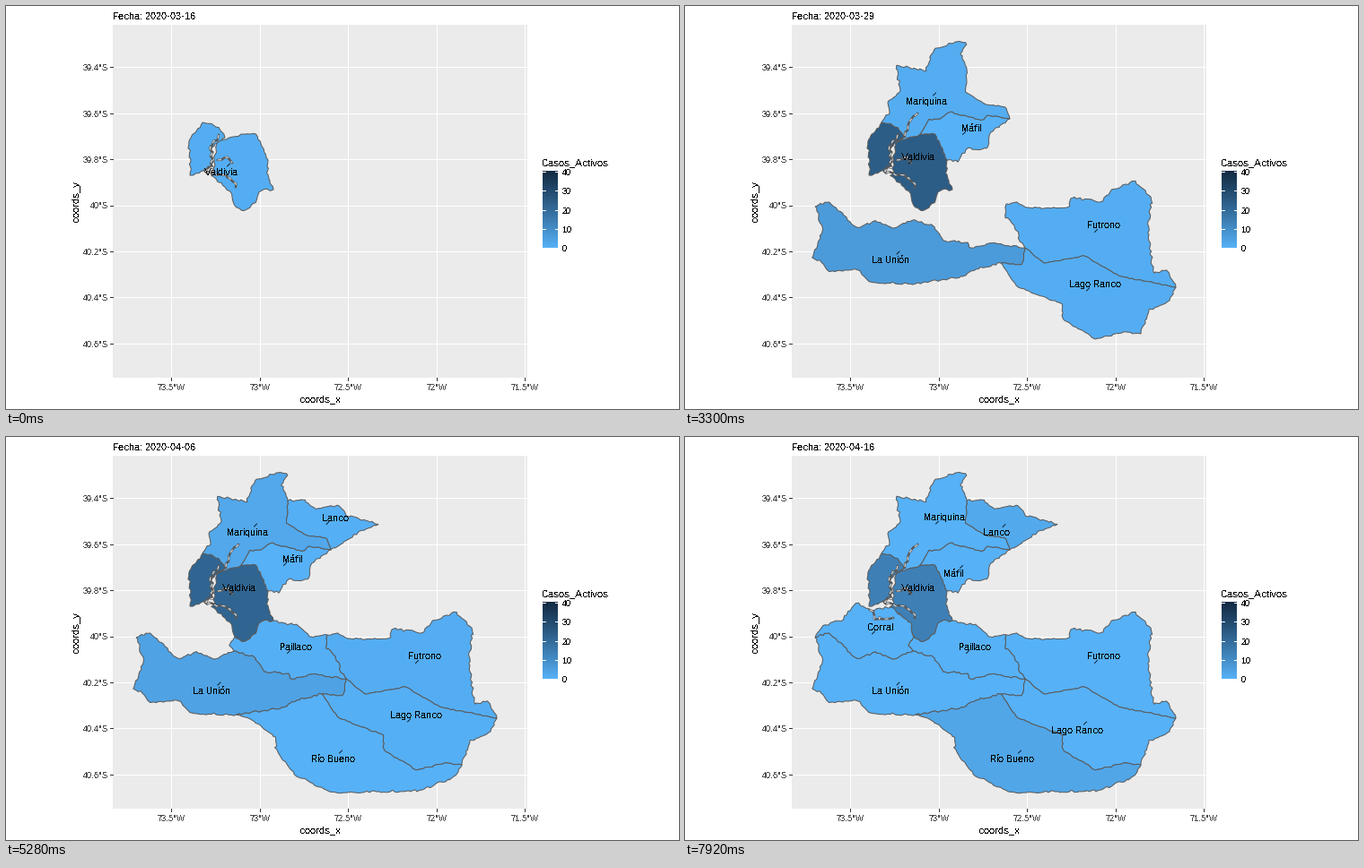
Recreate the animation shown at these times as a matplotlib script. Size 750 by 450 pixels, loop 8 s.

```python
import numpy as np
import matplotlib.pyplot as plt
from matplotlib.animation import FuncAnimation

plt.rcParams.update({
    "font.family": "Liberation Sans",
    "text.antialiased": False,
    "text.hinting": "native",
    "text.hinting_factor": 1,
})

W, H = 750, 450
TICK = 20            # ms per animation frame
STEP = 330           # ms per map state
LOOP = 8000
LAST = 24            # last map state
DAYS = 31            # days covered by the states
PANEL, EDGE, GREY = "#EBEBEB", "#595959", "#4D4D4D"
rng = np.random.default_rng(16)


# ---- colour scale: straight line in Lab between two blues ----
TO_XYZ = np.array([[.4124, .3576, .1805], [.2126, .7152, .0722], [.0193, .1192, .9505]])
WHITE = TO_XYZ.sum(axis=1)


def rgb_to_lab(rgb):
    c = np.array(rgb) / 255
    lin = np.where(c > .04045, ((c + .055) / 1.055) ** 2.4, c / 12.92)
    f = np.cbrt(TO_XYZ @ lin / WHITE)
    return np.array([116 * f[1] - 16, 500 * (f[0] - f[1]), 200 * (f[1] - f[2])])


def lab_to_rgb(lab):
    fy = (lab[0] + 16) / 116
    f = np.array([fy + lab[1] / 500, fy, fy - lab[2] / 200])
    lin = np.clip(np.linalg.inv(TO_XYZ) @ (f ** 3 * WHITE), 0, 1)
    return np.where(lin > .0031308, 1.055 * lin ** (1 / 2.4) - .055, 12.92 * lin)


LIGHT, DARK = rgb_to_lab((86, 177, 247)), rgb_to_lab((19, 43, 67))


def shade(cases):
    return lab_to_rgb(LIGHT + (DARK - LIGHT) * cases / 40)


# ---- borders: a few key points, resampled every 3 px and jittered ----
def border(*points, amp=1.3):
    p = np.array(points, float)
    run = np.r_[0, np.cumsum(np.hypot(*np.diff(p, axis=0).T))]
    s = np.linspace(0, run[-1], max(2, int(run[-1] / 3)))
    out = np.column_stack([np.interp(s, run, p[:, 0]), np.interp(s, run, p[:, 1])])
    out[1:-1] += rng.uniform(-amp, amp, out[1:-1].shape)
    return out


def join(*arcs):
    return np.vstack(arcs)


def back(arc):
    return arc[::-1]


# Valdivia lies on both sides of a river
val_mar_w = border((219, 130), (238, 135), (244, 147))
val_west = border((244, 147), (229, 158), (230, 178), (206, 190), (205, 167), (203, 150),
                  (213, 138), (219, 130))
val_mar_e = border((236, 152), (262, 143))
val_maf = border((262, 143), (279, 143), (292, 172), amp=.7)
val_east = border((292, 172), (291, 188), (298, 205))
val_pai = border((298, 205), (283, 206), (280, 216), (267, 230), (255, 223))
val_cor = border((255, 223), (252, 209), (229, 190), (233, 185))
val_river = border((233, 185), (232, 165), (236, 152), amp=2)

# north
mar_coast = border((219, 130), (228, 118), (226, 107), (240, 95), (235, 66), (268, 72),
                   (277, 48), (303, 40), (314, 42), (307, 53), (314, 71))
mar_lan = border((314, 71), (313, 96), (333, 109), (357, 113), (362, 126), amp=.7)
mar_maf = border((362, 126), (338, 122), (330, 128), (295, 118), (284, 126), (272, 127),
                 (262, 143), amp=.8)
maf_east = border((362, 126), (340, 142), (336, 160), (313, 159), (305, 174), (292, 172))
lan_east = border((314, 71), (332, 71), (345, 80), (372, 77), (380, 88), (415, 97),
                  (390, 108), (371, 120), (362, 126))

# south
uni_cor = border((145, 224), (160, 218), (191, 247), (214, 240), (231, 248), (254, 239))
uni_pai = border((254, 239), (278, 246), (288, 262), (315, 264), (317, 271), (343, 265),
                 (379, 270))
uni_lag = border((379, 270), (376, 289), (352, 287), amp=.6)
uni_rio = border((352, 287), (325, 293), (308, 302), (257, 310))
uni_coast = border((257, 310), (205, 309), (193, 293), (163, 297), (149, 284), (141, 280),
                   (154, 250), (145, 224))
cor_coast = border((145, 224), (153, 211), (176, 204), (190, 184), (206, 193), (229, 190),
                   (252, 209), (255, 223))
cor_pai = border((255, 223), (250, 233), (254, 239))
pai_north = border((298, 205), (327, 211), (342, 224), (358, 221))
pai_fut = border((358, 221), (356, 235), (364, 240), (374, 262), (379, 270))
fut_east = border((358, 221), (371, 219), (380, 226), (428, 224), (431, 214), (464, 219),
                  (476, 205), (501, 196), (520, 214), (516, 250), (522, 298), (537, 295),
                  (547, 314))
fut_lag = border((547, 314), (485, 302), (445, 279), (400, 287), (379, 270), amp=.6)
lag_east = border((547, 314), (540, 329), (518, 339), (508, 366))
lag_rio = border((508, 366), (490, 364), (458, 372), (421, 350), (420, 333), (370, 313),
                 (352, 287), amp=.8)
rio_south = border((508, 366), (500, 380), (460, 395), (362, 397), (322, 377), (300, 348),
                   (302, 337), (273, 315), (257, 310))

# narrow waters inside a district
val_waters = [border((237, 144), (228, 158), (230, 178), (222, 185), (250, 191), (256, 202), amp=2),
              border((236, 172), (247, 168), (252, 175), amp=1)]
mar_waters = [border((259, 120), (250, 128), (245, 146), amp=2)]
cor_waters = [border((206, 193), (212, 203), (232, 202), amp=2)]


# ---- stage ----
fig = plt.figure(figsize=(W / 72, H / 72), dpi=72, facecolor="white")
ax = fig.add_axes([0, 0, 1, 1])
ax.axis("off")
ramp = np.array([[shade(v)] for v in np.linspace(40, 0, 86)])
ax.imshow(ramp, extent=(598, 615, 270, 184), aspect="auto", zorder=1)
ax.set_xlim(0, W)
ax.set_ylim(H, 0)


def line(x, y, color, width=1, z=2, style="-"):
    return ax.plot(x, y, color=color, lw=width, zorder=z, ls=style)[0]


def write(x, y, text, size=11, color="black", **kw):
    return ax.text(x, y, text, fontsize=size, color=color, va="baseline", zorder=9, **kw)


ax.add_patch(plt.Rectangle((119, 21), 462, 394, fc=PANEL, ec="none", zorder=0))
for k in range(7):
    y = 68.3 + 51.4 * k
    line((119, 581), (y, y), "white", z=1)
    line((116, 119), (y, y), "#333333")
    write(114, round(y) + 4, f"{39.4 + .2 * k:.3g}°S", 9, GREY, ha="right")
for k in range(5):
    x = 184.4 + 98.5 * k
    line((x, x), (21, 415), "white", z=1)
    line((x, x), (415, 418), "#333333")
    write(x, 429, f"{73.5 - .5 * k:g}°W", 9, GREY, ha="center")
write(350, 442, "coords_x", ha="center")
write(81, 218, "coords_y", ha="center", rotation=90, rotation_mode="anchor")

write(597, 178, "Casos_Activos")
for v in range(0, 41, 10):
    y = 270 - v * 2.125
    line((598, 601), (y, y), "white")
    line((612, 615), (y, y), "white")
    write(620, round(y) + 4, str(v), 9)
title = write(119, 15, "")


class Region:
    def __init__(self, name, anchor, parts, cases, low=(), waters=()):
        """cases: (state, value) keys, the first is the entrance; low: states with label below."""
        self.keys, self.values = zip(*cases)
        self.low = low
        self.x, self.y = anchor
        self.fills = [ax.add_patch(plt.Polygon(p, ec=EDGE, lw=1, zorder=3)) for p in parts]
        self.label = write(0, 0, name, ha="center")
        self.leader = line([0], [0], "black", .8, 8)
        self.arts = self.fills + [self.label, self.leader]
        for w in waters:
            self.arts += [line(*w.T, EDGE, 2.4, 4), line(*w.T, PANEL, 1, 5, (0, (4, 5)))]

    def show(self, state):
        on = state >= self.keys[0]
        for art in self.arts:
            art.set_visible(on)
        if not on:
            return
        color = shade(np.interp(state, self.keys, self.values))
        for fill in self.fills:
            fill.set_facecolor(color)
        dx, dy, s = (-10, 9, -3) if state in self.low else (10, -8, 3)
        self.label.set_position((self.x + dx, self.y + dy + 4))
        self.leader.set_data((self.x, self.x + s), (self.y, self.y - s))


regions = [
    Region("Valdivia", (249.5, 176),
           [join(val_mar_w, val_west),
            join(val_mar_e, val_maf, val_east, val_pai, val_cor, val_river)],
           [(0, 1), (6, 1), (8, 11), (10, 24), (14, 25), (19, 16.5), (24, 13.5)],
           low=(0, 2, 4, 19), waters=val_waters),
    Region("La Unión", (239, 274), [join(uni_cor, uni_pai, uni_lag, uni_rio, uni_coast)],
           [(5, 1), (10, 6), (19, 3), (24, 0)], low=range(6, 25)),
    Region("Máfil", (309.5, 143.5), [join(mar_maf, val_maf, back(maf_east))],
           [(7, 0)], low=(7, 8, 24)),
    Region("Mariquina", (279.5, 97),
           [join(mar_coast, mar_lan, mar_maf, back(val_mar_e), back(val_mar_w))],
           [(9, 1), (19, 3), (24, 0)], low=range(9, 24), waters=mar_waters),
    Region("Futrono", (456.5, 252.5), [join(fut_east, fut_lag, back(pai_fut))],
           [(9, 1), (19, 1), (24, 0)]),
    Region("Lago Ranco", (447.5, 318),
           [join(fut_lag, uni_lag, back(lag_rio), back(lag_east))],
           [(9, 1), (14, 1), (19, 0)], low=(9, 14, 18, 24)),
    Region("Lanco", (357, 97.5), [join(lan_east, back(mar_lan))],
           [(12, 1), (19, 0), (24, 2)], low=(24,)),
    Region("Paillaco", (313.5, 241.5),
           [join(pai_north, pai_fut, back(uni_pai), back(cor_pai), back(val_pai))],
           [(13, 1), (19, 0)]),
    Region("Río Bueno", (374.5, 350), [join(rio_south, back(uni_rio), back(lag_rio))],
           [(15, 0), (19, 0), (24, 3)], low=(15, 16, 17, 19, 20, 21, 22, 24)),
    Region("Corral", (208.5, 220), [join(cor_coast, cor_pai, back(uni_cor))],
           [(23, 0)], waters=cor_waters),
]


def update(i):
    state = min((i * TICK + TICK // 2) // STEP, LAST)
    day = np.datetime64("2020-03-16") + round(state * DAYS / LAST)
    title.set_text(f"Fecha: {day}")
    for region in regions:
        region.show(state)
    return []


anim = FuncAnimation(fig, update, frames=LOOP // TICK, interval=TICK,
                     init_func=lambda: update(0), repeat=True, repeat_delay=0, blit=False)
plt.show()
```
